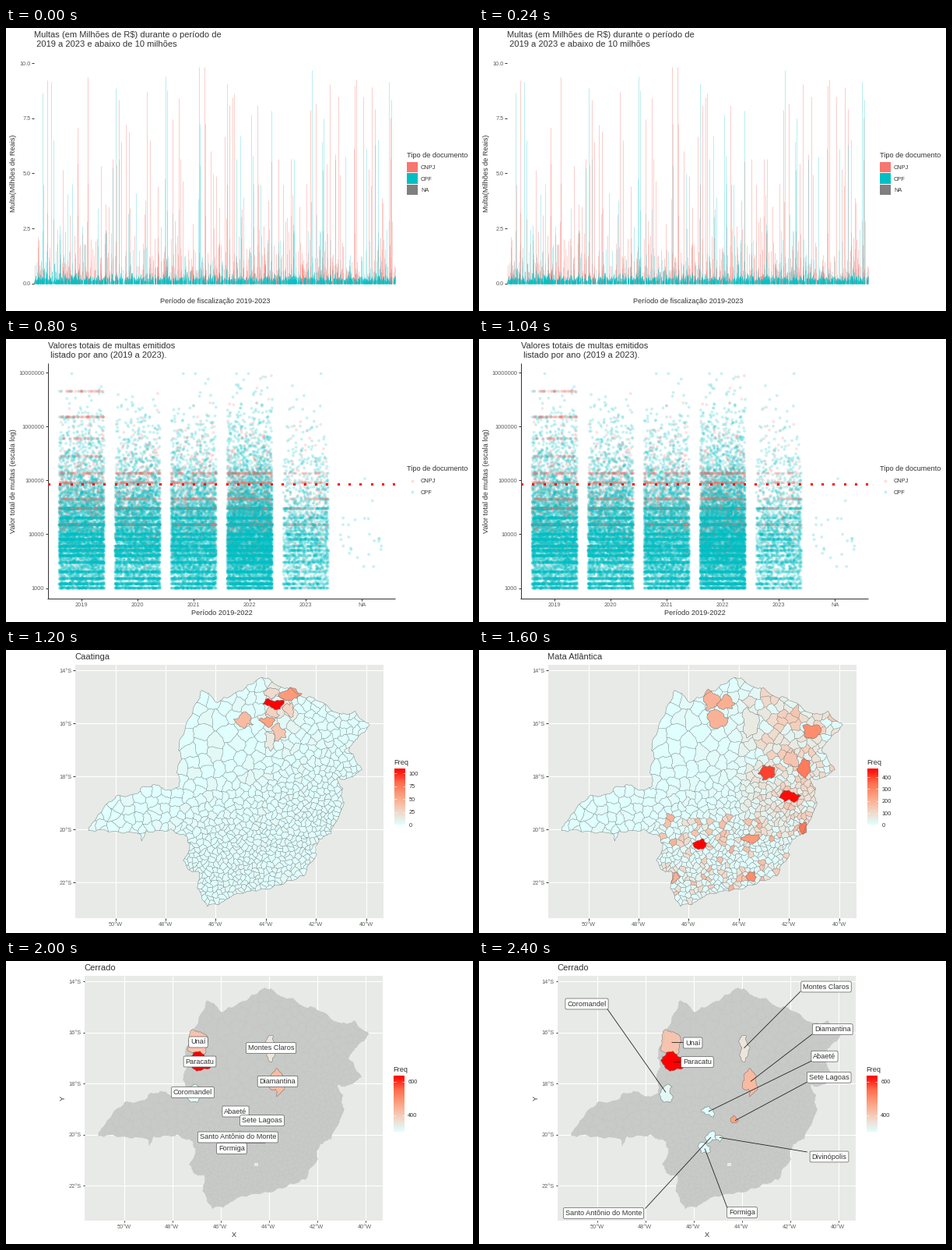
These frames come from a looping animation (600 by 363 pixels, 2.8 s). A matplotlib script:

```python
import numpy as np
import matplotlib.pyplot as plt
from matplotlib.animation import FuncAnimation
from matplotlib.collections import PolyCollection
from matplotlib.colors import LinearSegmentedColormap
from matplotlib.patches import Polygon, Rectangle
from matplotlib.path import Path

W, H, DPI = 600, 363, 100
RED, TEAL, GREY = "#F8766D", "#00BFC4", "#7F7F7F"
INK, SOFT, PANEL = "#333333", "#606060", "#E8EAE7"
TITLE, LABEL, TICK = 11.1, 9.1, 7.4
YEARS = ["2019", "2020", "2021", "2022", "2023", "NA"]
HEAT = LinearSegmentedColormap.from_list(
    "heat", ["#E0FFFF", "#F3D3C2", "#FCA383", "#FF6D4C", "#FF0000"])

plt.rcParams["font.family"] = "Liberation Sans"
fig = plt.figure(figsize=(W / DPI, H / DPI), dpi=DPI, facecolor="white")


def px(n):
    return n * 72 / DPI


def scene():
    ax = fig.add_axes([0, 0, 1, 1])
    ax.set_xlim(0, W)
    ax.set_ylim(H, 0)
    ax.axis("off")
    return ax


def write(ax, x, y, s, size=TICK, color=INK, ha="left"):
    ax.text(x, y + 0.36 * size, s, fontsize=px(size), color=color, ha=ha,
            va="baseline", parse_math=False, zorder=6)


def write_up(ax, x, y, s):
    ax.text(x, y, s, fontsize=px(LABEL), color=INK, rotation=90,
            ha="center", va="center", zorder=6)


def line(ax, xs, ys, color=INK, width=1.0, z=3):
    ax.plot(xs, ys, color=color, lw=px(width), zorder=z,
            solid_capstyle="butt")


def box(ax, x0, y0, x1, y1, color, z=1):
    ax.add_patch(Rectangle((x0, y0), x1 - x0, y1 - y0, fc=color, lw=0,
                           zorder=z))


def title(ax, x, first, second=None):
    write(ax, x, 8, first, TITLE)
    if second:
        write(ax, x, 19.8, " " + second, TITLE)


def y_ticks(ax, x, marks):
    for y, s in marks:
        line(ax, [x - 2.7, x], [y, y])
        write(ax, x - 4.5, y, s, color=SOFT, ha="right")


def x_ticks(ax, y, marks, gap=7.5):
    for x, s in marks:
        line(ax, [x, x], [y, y + 2.7])
        write(ax, x, y + gap, s, color=SOFT, ha="center")


def frame_axes(ax, x):
    line(ax, [x, x], [31, 333])
    line(ax, [x - 0.5, 500], [333, 333])


def key_legend(ax, y):
    write(ax, 515, y, "Tipo de documento", LABEL)
    for i, (name, color) in enumerate(
            [("CNPJ", RED), ("CPF", TEAL), ("NA", GREY)]):
        top = y + 9.3 + 14.4 * i
        box(ax, 515, top, 528.6, top + 13.6, color)
        write(ax, 533, top + 6.9, name)


# ---------- thin bars over the inspection period ----------
def spikes_scene():
    ax, rng, base = scene(), np.random.default_rng(4), 327.5

    def bars(heights, color, alpha):
        xs = rng.uniform(36, 500, len(heights))
        ax.vlines(xs, base - heights, base, colors=color, lw=px(1),
                  alpha=alpha, zorder=2)

    def cloud(n, mid, spread, color, alpha):
        h = rng.lognormal(np.log(mid), spread, n)
        bars(np.minimum(h, 160), color, alpha)

    cloud(560, 18, 0.95, RED, 0.36)
    cloud(260, 18, 1.0, TEAL, 0.27)
    cloud(50, 9, 0.6, GREY, 0.35)
    cloud(1300, 5, 0.5, TEAL, 0.6)
    bars(rng.uniform(110, 282, 42), RED, 0.36)
    bars(rng.uniform(110, 282, 28), TEAL, 0.27)

    title(ax, 35.5, "Multas (em Milhões de R$) durante o período de",
          "2019 a 2023 e abaixo de 10 milhões")
    y_ticks(ax, 36, [(base - 28.25 * v, f"{v:.1f}")
                     for v in (0, 2.5, 5, 7.5, 10)])
    write(ax, 268.5, 350, "Período de fiscalização 2019-2023", LABEL,
          ha="center")
    write_up(ax, 10, 186, "Multa(Milhões de Reais)")
    key_legend(ax, 162.5)
    return ax


# ---------- stacked totals per year ----------
def totals_scene():
    ax, rng, base = scene(), np.random.default_rng(8), 319.7
    bars = [(44.5, 222), (267.5, 286), (268, 279.5), (242, 266.5),
            (309.7, 312.5)]
    for i, (top, mid) in enumerate(bars):
        x = 48.6 + 74.85 * i
        box(ax, x, top, x + 67.2, mid, RED)
        box(ax, x, mid, x + 67.2, base, TEAL)
        for y in rng.uniform(top + (mid - top) / 2, base - 2, 9 - 2 * i):
            line(ax, [x, x + 67.2], [y, y], "white", 0.8)
    title(ax, 37.5, "Valores totais de multas emitidos",
          "listado por ano (2019 a 2023).")
    frame_axes(ax, 37.5)
    y_ticks(ax, 37.5, [(319.5 - 0.121 * v, str(v))
                       for v in range(0, 2001, 500)])
    x_ticks(ax, 333, [(82.2 + 74.8 * i, s) for i, s in enumerate(YEARS)])
    write(ax, 269, 350.3, "Ano", LABEL, ha="center")
    write_up(ax, 10, 182, "Valor total de multas")
    key_legend(ax, 158.5)
    return ax


# ---------- jittered values on a log scale ----------
def jitter_scene():
    ax, rng = scene(), np.random.default_rng(11)
    steps = np.log10(1000 * np.r_[1:7, 1.2, 1.5, 8, 10, 15, 20, 30])
    fines = np.log10(15000 * np.array([1, 2, 3, 6, 9]))
    large = np.log10([2.8e5, 6e5, 1.5e6, 1.5e6, 4.5e6])

    def log_y(v):
        return 319.5 - 69.1 * (v - 3)

    def mixed(n, mid, levels, share):
        v = rng.normal(mid, 0.6, n)
        tail = rng.random(n) < 0.11
        v[tail] = rng.normal(5.2, 0.62, tail.sum())
        low = v < 3
        v[low] = 3 + rng.random(low.sum())
        flat = rng.random(n) < share
        v[flat] = rng.choice(levels, flat.sum())
        return np.clip(v, 3, 6.98)

    xs, vs, reds = [], [], []

    def add(i, values, is_red):
        xs.append(97.2 + 72 * i + rng.uniform(-29, 29, len(values)))
        vs.append(values)
        reds.append(np.full(len(values), is_red))

    for i, n in enumerate([5600, 5000, 5000, 8000, 1900]):
        add(i, mixed(n, 3.95, steps, 0.33), False)
        add(i, mixed(n // 8, 4.5, fines, 0.5), True)
    add(0, rng.choice(large, 130), True)
    add(0, rng.choice(large, 40), False)
    add(5, rng.normal(3.9, 0.4, 26).clip(3.4, 5.2), False)

    x, v, red = map(np.concatenate, (xs, vs, reds))
    order = rng.permutation(len(x))
    ax.scatter(x[order], log_y(v[order]), s=px(3.8) ** 2,
               c=np.where(red[order], RED, TEAL), alpha=0.21, lw=0, zorder=2)
    dots = np.arange(55, 500, 14.3)
    ax.plot(dots, 0 * dots + 185.5, "s", color="red", ms=px(3), mew=0,
            zorder=4)

    title(ax, 53.5, "Valores totais de multas emitidos",
          "listado por ano (2019 a 2023).")
    frame_axes(ax, 53.5)
    y_ticks(ax, 53.5, [(log_y(p), str(10 ** p)) for p in range(3, 8)])
    x_ticks(ax, 333, [(97.2 + 72 * i, s) for i, s in enumerate(YEARS)])
    write(ax, 277, 350.3, "Período 2019-2022", LABEL, ha="center")
    write_up(ax, 10, 182.5, "Valor total de multas (escala log)")
    write(ax, 515, 166, "Tipo de documento", LABEL)
    for y, name, color in [(181.7, "CNPJ", RED), (196, "CPF", TEAL)]:
        ax.scatter([522], [y], s=px(3.8) ** 2, c=color, alpha=0.25, lw=0)
        write(ax, 533, y, name)
    return ax


# ---------- map geometry, in pixels of the large map ----------
BORDER = [(107, 232), (110, 222), (131, 197), (140, 188), (164, 186),
          (174, 177), (189, 173), (213, 181), (223, 174), (220, 148),
          (227, 137), (221, 127), (231, 98), (246, 66), (252, 51), (272, 67),
          (297, 55), (324, 37), (335, 35), (348, 46), (366, 50), (384, 62),
          (394, 60), (430, 83), (447, 80), (466, 95), (463, 104), (448, 114),
          (441, 128), (456, 154), (440, 166), (425, 164), (431, 178),
          (433, 200), (417, 236), (401, 242), (398, 262), (382, 289),
          (340, 305), (290, 314), (277, 324), (258, 328), (247, 306),
          (248, 285), (232, 281), (229, 270), (237, 250), (229, 237),
          (212, 231), (179, 233), (175, 244), (171, 235), (118, 231)]


def warp(p):
    """Bend straight borders with a small, smooth displacement."""
    x, y = np.asarray(p, float).T
    dx = 1.2 * np.sin(0.33 * y + 0.1 * x) + 0.55 * np.sin(y - 0.5 * x + 1)
    dy = 1.2 * np.sin(0.35 * x - 0.12 * y + 2) + 0.55 * np.sin(x + 0.6 * y)
    return np.column_stack([x + dx, y + dy])


def rough(p, n=5):
    p = np.asarray(p, float)
    t = np.linspace(0, 1, n, endpoint=False)[None, :, None]
    q = p[:, None] * (1 - t) + np.roll(p, -1, 0)[:, None] * t
    return warp(q.reshape(-1, 2))


def spacing(x, y):
    west = 12 * np.exp(-((x - 250) / 105) ** 2 - ((y - 115) / 72) ** 2)
    nose = 8 * np.exp(-((x - 140) / 70) ** 2 - ((y - 200) / 40) ** 2)
    north = 4 / (1 + np.exp((y - 130) / 20))
    return 5.6 + west + nose + north


def scatter_sites(rng):
    pts = rng.uniform((105, 33), (468, 330), (24000, 2))
    pts = pts[Path(BORDER).contains_points(pts)]
    reach = spacing(*pts.T) * rng.uniform(0.7, 1.15, len(pts))
    sites = np.full((len(pts), 2), 1e6)
    n = 0
    for p, r in zip(pts, reach):
        if ((sites[:n] - p) ** 2).sum(1).min(initial=1e9) > r * r:
            sites[n] = p
            n += 1
    return sites[:n]


def clip(poly, mid, normal):
    """Keep the part of a polygon on the inner side of a line."""
    out = []
    side = [(x - mid[0]) * normal[0] + (y - mid[1]) * normal[1]
            for x, y in poly]
    for i, (x, y) in enumerate(poly):
        a, b = side[i - 1], side[i]
        if (a < 0) != (b < 0):
            t, (u, v) = a / (a - b), poly[i - 1]
            out.append((u + t * (x - u), v + t * (y - v)))
        if b < 0:
            out.append((x, y))
    return out


def cells_of(sites):
    cells = []
    for p in sites:
        x, y = p
        poly = [(x - 45, y - 45), (x + 45, y - 45),
                (x + 45, y + 45), (x - 45, y + 45)]
        near = np.argsort(((sites - p) ** 2).sum(1))[1:28]
        for q in sites[near]:
            poly = clip(poly, (p + q) / 2, q - p)
        cells.append(rough(poly))
    return cells


SITES = scatter_sites(np.random.default_rng(7))
CELLS = cells_of(SITES)
OUTLINE = rough(BORDER, 8)


def small(p):
    """Large-map pixels to small-map pixels."""
    return (np.asarray(p) - (140.5, 26)) * (31 / 32.2, 32.75 / 34) \
        + (151.5, 26)


def draw_cells(ax, cells, outline, fills, edge, width, rim):
    coll = PolyCollection(cells, facecolors=fills, edgecolors=edge,
                          linewidths=px(width), zorder=2)
    ax.add_collection(coll, autolim=False)
    coll.set_clip_path(Path(np.vstack([outline, outline[:1]])), ax.transData)
    ax.add_patch(Polygon(outline, fc="none", ec=rim, lw=px(0.4), zorder=3.5))


def map_base(name, x0, y0, x1, y1, lon0, dlon, dlat):
    ax = scene()
    box(ax, x0, y0, x1, y1, PANEL, 0)
    lons = [(lon0 + dlon * i, f"{50 - 2 * i}°W") for i in range(6)]
    lats = [(26 + dlat * i, f"{14 + 2 * i}°S") for i in range(5)]
    for x, _ in lons:
        line(ax, [x, x], [y0, y1], "white", 1.1, 0.5)
    for y, _ in lats:
        line(ax, [x0, x1], [y, y], "white", 1.1, 0.5)
    x_ticks(ax, y1, lons, 7.7)
    y_ticks(ax, x0, lats)
    title(ax, x0 - 0.5, name)
    return ax


def heat_legend(ax, x, y, marks):
    write(ax, x - 0.7, y - 8.5, "Freq", LABEL)
    ax.imshow(np.linspace(1, 0, 200)[:, None], cmap=HEAT, aspect="auto",
              extent=(x, x + 14, y + 72, y), zorder=1)
    for my, s in marks:
        for a in (x, x + 11.2):
            line(ax, [a, a + 2.8], [my, my], "white", 0.6)
        write(ax, x + 18.5, my, s)


def blob(ax, cx, cy, rx, ry, shade):
    """An irregular district around a centre."""
    rng = np.random.default_rng(int(cx * 7 + cy))
    a = np.linspace(0, 2 * np.pi, 12, endpoint=False)
    r = rng.uniform(0.7, 1.25, 12)
    p = rough(np.column_stack([cx + rx * r * np.cos(a),
                               cy + ry * r * np.sin(a)]), 3)
    ax.add_patch(Polygon(p, fc=HEAT(shade), ec="#666666", lw=px(0.45),
                         zorder=3))


def biome_scene(name, shades, hot, step, unit):
    ax = map_base(name, 89, 19.3, 485, 344, 140.5, 64.4, 68)
    draw_cells(ax, CELLS, OUTLINE, HEAT(shades), "#6A7272", 0.32, "#666666")
    for spot in hot:
        blob(ax, *spot)
    heat_legend(ax, 499, 152.5, [(224.3 - unit * step * k, str(step * k))
                                 for k in range(5)])
    return ax


def caatinga_scene():
    x, y = SITES.T
    u = np.random.default_rng(2).random(len(x))
    shades = 0.04 * u ** 3
    shades += 0.2 * u * np.exp(-((x - 350) / 16) ** 2 - ((y - 75) / 35) ** 2)
    hot = [(339, 117, 6, 14, 0.12), (341, 55, 9, 7, 0.2),
           (342, 80, 10, 6, 0.26), (363, 76, 6, 9, 0.25),
           (351, 106, 9, 10, 0.32), (306, 90, 12, 9, 0.38),
           (336, 92, 10, 6, 0.5), (365, 56, 14, 7, 0.54),
           (345, 69, 12, 6, 1.0)]
    return biome_scene("Caatinga", shades, hot, 25, 0.664)


def atlantic_scene():
    rng = np.random.default_rng(5)
    x, y = SITES.T
    u = rng.random(len(x))
    east = (y < 236) / (1 + np.exp(-(x - 350) / 10))
    south = (y >= 215) * (x > 235)
    shades = np.maximum(0.3 * east * u, 0.42 * south * u ** 4)
    shades += 0.03 * rng.random(len(x)) ** 2
    hot = [(298, 64, 10, 12, 0.42), (318, 68, 11, 9, 0.44),
           (306, 88, 13, 10, 0.42), (350, 92, 11, 18, 0.12),
           (402, 140, 8, 12, 0.33), (429, 104, 12, 10, 0.6),
           (418, 152, 9, 10, 0.68), (370, 157, 9, 9, 0.85),
           (416, 228, 5, 8, 0.7), (348, 242, 10, 6, 0.54),
           (350, 289, 7, 6, 0.6), (252, 293, 4, 7, 0.43),
           (399, 188, 12, 7, 0.97), (284, 249, 9, 6, 1.0)]
    return biome_scene("Mata Atlântica", shades, hot, 100, 0.1535)


# ---------- labelled towns: centre, radii, shade, far label ----------
TOWNS = {
    "Divinópolis": (309, 226.4, 5, 4, 0.02, 450, 251),
    "Unaí": (247, 104, 16, 18, 0.33, 274.7, 105),
    "Paracatu": (249, 129, 15, 12, 1.0, 280.3, 129.7),
    "Montes Claros": (340.5, 111.7, 6, 16, 0.15, 446, 33),
    "Diamantina": (349, 154.5, 9, 16, 0.38, 454.3, 87.7),
    "Coromandel": (240, 168.5, 8, 13, 0.04, 138.5, 55),
    "Abaeté": (295, 193, 9, 6, 0.0, 444, 122.2),
    "Sete Lagoas": (329, 204.7, 4, 5, 0.5, 449.7, 149.3),
    "Santo Antônio do Monte": (298, 226, 7, 6, 0.01, 160, 323.5),
    "Formiga": (290, 240.5, 8, 7, 0.0, 338, 322.5),
}


def tag(ax, x, y, name):
    ax.text(x, y, name, fontsize=px(LABEL), color=INK, ha="center",
            va="center", zorder=6,
            bbox=dict(boxstyle="round,pad=0.27,rounding_size=0.2",
                      fc="white", ec="#444444", lw=px(0.6)))


def towns_scene(far):
    ax = map_base("Cerrado", 101.3, 19.3, 484, 332.5, 151.5, 62, 65.5)
    draw_cells(ax, [small(c) for c in CELLS], small(OUTLINE), "#C8CAC8",
               "#BFC2BF", 0.4, "#C0C3C0")
    for name, (x, y, rx, ry, shade, fx, fy) in TOWNS.items():
        blob(ax, x, y, rx, ry, shade)
        if far:
            half = 2.3 * len(name) + 3
            sx = np.clip(x, fx - half, fx + half)
            sy = np.clip(y, fy - 6, fy + 6)
            line(ax, [sx, x], [sy, y], "#1A1A1A", 0.8, 5)
            tag(ax, fx, fy, name)
        else:
            tag(ax, x, y, name)
    box(ax, 319, 259, 324, 263, PANEL, 4)
    write(ax, 292.5, 350.3, "X", LABEL, ha="center")
    write_up(ax, 73, 176, "Y")
    heat_legend(ax, 497.7, 147, [(154.5, "600"), (197.5, "400")])
    return ax


scenes = [spikes_scene(), totals_scene(), jitter_scene(), caatinga_scene(),
          atlantic_scene(), towns_scene(False), towns_scene(True)]


def show(i):
    for k, ax in enumerate(scenes):
        ax.set_visible(k == i)
    return scenes


anim = FuncAnimation(fig, show, frames=len(scenes), interval=400,
                     init_func=lambda: show(0), repeat=True, repeat_delay=0,
                     blit=False)
plt.show()
```
